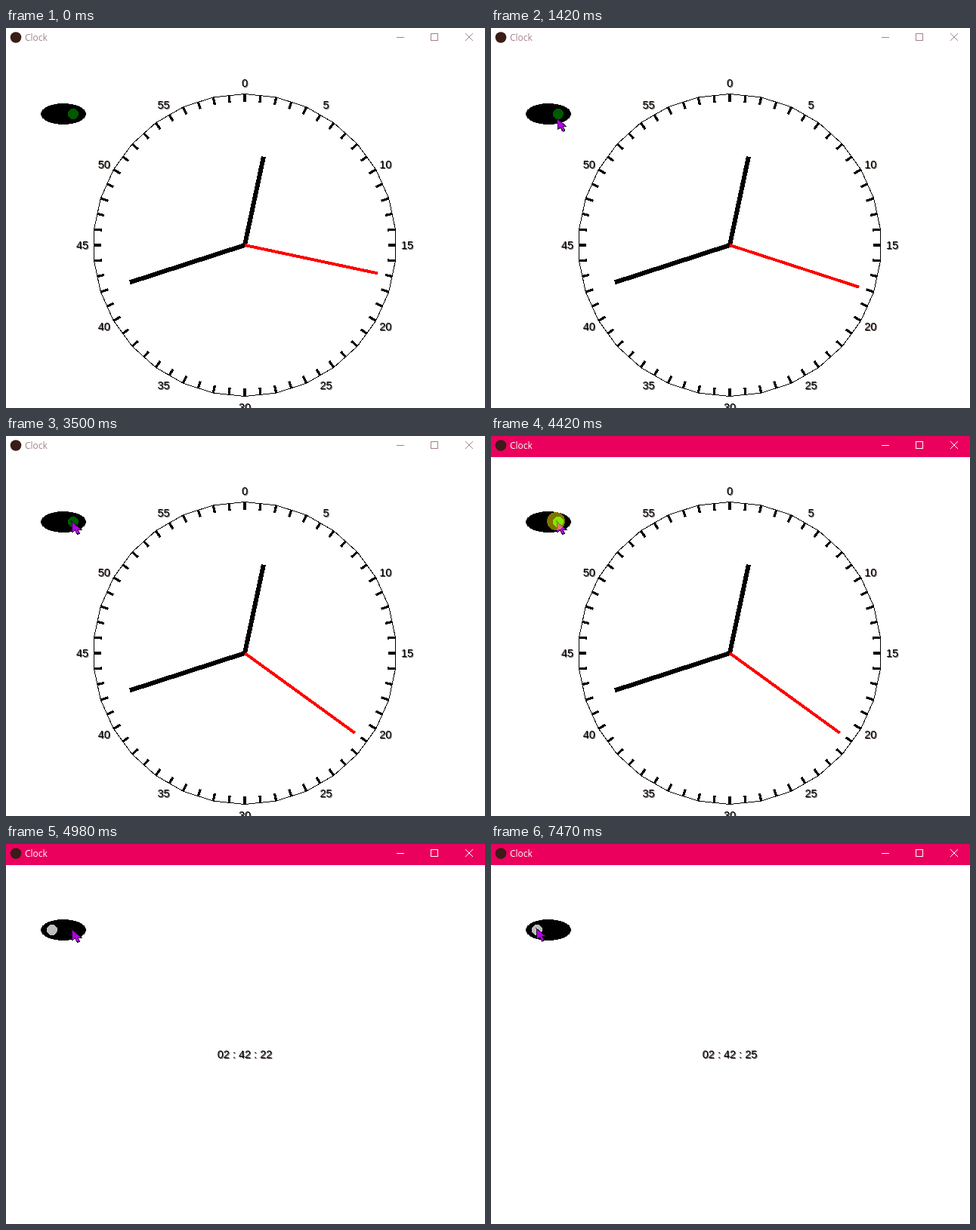
Recreate the animation shown at these times as an HTML page. Size 634 by 504 pixels, loop 8 s.

```html
<!DOCTYPE html>
<html lang="en">
<head>
<meta charset="utf-8">
<title>Clock</title>
<style>
  html, body { margin: 0; width: 100%; height: 100%; overflow: hidden; background: #fff; }
  svg { display: block; shape-rendering: crispEdges; }
  .label text { font: 14.5px "Liberation Sans", Arial, sans-serif; text-anchor: middle; }
  .shadow { fill: #685c58; }
  #bar { color: #a4818b; }
  #bar.active { color: #fff; }
  #bar rect { fill: none; }
  #bar.active rect { fill: #eb005e; }
  #bar text { font: 12px "Open Sans", "Noto Sans", sans-serif; fill: currentColor; }
  #bar path { fill: none; stroke: currentColor; }
  .smooth { shape-rendering: auto; }
  .ink { fill: none; stroke: #000; }
</style>
</head>
<body>
<svg width="634" height="504">
  <g id="bar">
    <rect width="634" height="28"/>
    <circle class="smooth" cx="13" cy="12.5" r="7.3" fill="#3a1c18"/>
    <text x="25" y="17">Clock</text>
    <path d="M517 12.5h10M562.5 7.5h9v9h-9z"/>
    <path class="smooth" d="M608 7l10 10m0-10l-10 10"/>
  </g>
  <g id="dial" transform="translate(316 288)"></g>
  <g id="digits" class="label"></g>
  <ellipse cx="76" cy="114" rx="30" ry="14"/>
  <circle id="knob" cy="114" r="7"/>
  <path id="pointer" d="M0 0L1 14L4.5 11.5L7.5 17L10.5 15.5L8 10.5L12.5 10.5Z"
        fill="#b400eb" stroke="#250830"/>
  <circle id="glow" cx="86" cy="113" r="12" fill="#ffe600"/>
</svg>
<script>
const LOOP = 8000, ENTER = 460, PRESS = 4420, RELEASE = 4560, GLOW_END = 4980;
const STEP = 76; // the pointer is refreshed at this interval
const [bar, dial, digits, knob, pointer, glow] =
  ['bar', 'dial', 'digits', 'knob', 'pointer', 'glow'].map(id => document.getElementById(id));

// Each move follows a Bezier curve through its control points.
const moves = [
  { start: ENTER, end: 1220, power: 1.7, points: [[450, 447], [150, 390], [35, 230], [88, 126]] },
  { start: 1220, end: 1560, power: 1, points: [[88, 126], [87, 113.5]] },
  { start: 5510, end: 6130, power: 1, points: [[87, 113.5], [64.5, 126], [61, 111]] },
  { start: 7340, end: 7470, power: 1, points: [[61, 111], [60, 112]] }
];

const polar = (minute, r) => {
  const a = minute * Math.PI / 30;
  return [r * Math.sin(a), -r * Math.cos(a)];
};

const hand = (id, minute, from, to, width, color = '#000') =>
  `<line id="${id}" y1="${-from}" y2="${-to}" stroke="${color}" stroke-width="${width}"
    transform="rotate(${minute * 6})"/>`;

const label = (text, x, y) =>
  `<text class="shadow" x="${x + 1}" y="${y + 6}">${text}</text><text x="${x}" y="${y + 5}">${text}</text>`;

function buildDial() {
  const minutes = [...Array(60).keys()];
  const rim = minutes.filter(m => m % 2 === 0).map(m => polar(m, 200.5));
  const ticks = minutes.map(m => hand('tick' + m, m, 190, 200, 3.2));
  const numbers = minutes.filter(m => m % 5 === 0).map(m => label(m, ...polar(m, 215)));
  dial.innerHTML = `<polygon class="ink" points="${rim}"/>${ticks.join('')}
    <g class="label">${numbers.join('')}</g>
    ${hand('hour', 2, 0, 120, 6)}${hand('minute', 42, 0, 160, 6)}${hand('second', 17, 0, 180, 4, '#f00')}`;
}

function bezier(points, u) {
  if (points.length === 1) return points[0];
  const between = points.slice(1).map((p, i) => p.map((v, axis) => points[i][axis] * (1 - u) + v * u));
  return bezier(between, u);
}

function pointerAt(t) {
  const { start, end, power, points } = moves.findLast(m => m.start <= t);
  const elapsed = Math.floor((t - start) / STEP) * STEP;
  const u = t >= end ? 1 : elapsed / (end - start);
  return bezier(points, 1 - (1 - u) ** power);
}

const show = (element, visible) => element.setAttribute('visibility', visible ? 'visible' : 'hidden');

function draw(t) {
  const seconds = 17 + Math.floor((t - ENTER) / 1001 + 1);
  const digital = t >= RELEASE;

  bar.classList.toggle('active', t >= PRESS);
  show(dial, !digital);
  show(digits, digital);
  dial.querySelector('#second').setAttribute('transform', `rotate(${seconds * 6})`);
  digits.innerHTML = label(`02 : 42 : ${seconds}`, 316, 279);

  knob.setAttribute('cx', digital ? 61 : 89);
  knob.setAttribute('fill', digital ? '#bebebe' : t < PRESS ? '#005a00' : '#00f000');

  show(pointer, t >= ENTER);
  if (t >= ENTER) pointer.setAttribute('transform', `translate(${pointerAt(t)})`);

  const fade = Math.min(1, (GLOW_END - t) / (GLOW_END - RELEASE));
  glow.setAttribute('opacity', t < PRESS ? 0 : 0.5 * Math.max(0, fade));
}

function frame() {
  draw(performance.now() % LOOP);
  requestAnimationFrame(frame);
}
buildDial();
frame();
</script>
</body>
</html>
```
